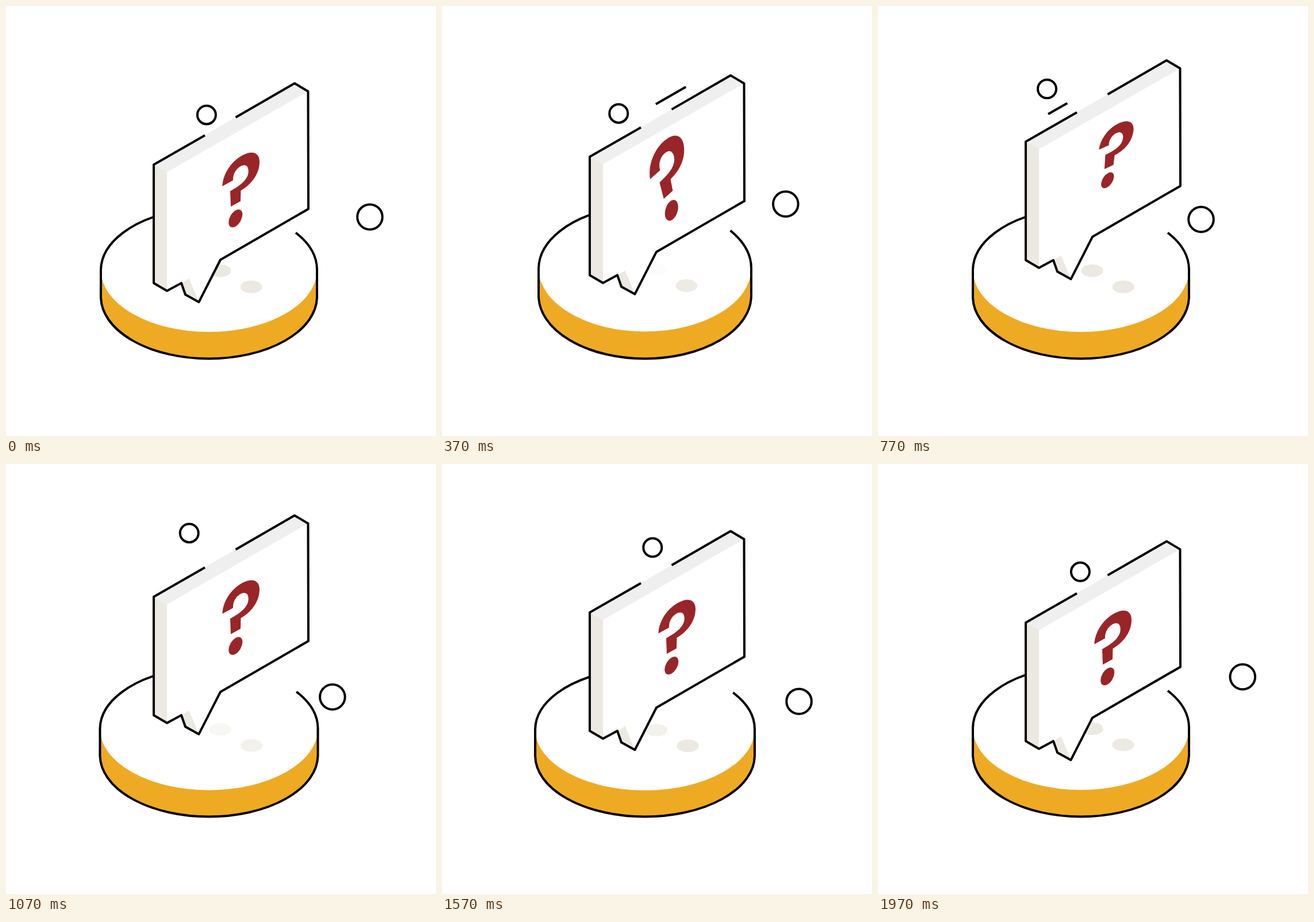
Write an HTML page that moves like this. It is 748 px wide and 748 px high and loops after 2000 ms.

```html
<!DOCTYPE html>
<html lang="en">
<head>
<meta charset="utf-8">
<title>Question bubble</title>
<style>
  html, body { margin: 0; width: 100%; height: 100%; overflow: hidden; background: #fff; }
  svg { display: block; width: 100vw; height: 100vh; }
  .ink { fill: none; stroke: #000; stroke-width: 4; stroke-linejoin: round; }
  .shade { fill: #ebe9e1; }
</style>
</head>
<body>
<svg viewBox="0 0 748 748">
  <g id="disc">
    <path fill="#efaa24" d="M165 459V505.500A188 108 0 0 0 541 505.500V459Z"/>
    <ellipse cx="353" cy="459" rx="188" ry="108" fill="#fff"/>
    <ellipse id="dotA" class="shade" cx="372.500" cy="460.500" rx="19" ry="11"/>
    <ellipse id="dotB" class="shade" cx="426.500" cy="488.500" rx="19" ry="11"/>
    <path class="ink" d="M300 356.300A188 108 0 0 0 165 459V505.500A188 108 0 0 0 541 505.500V459A188 108 0 0 0 504 394.300"/>
  </g>

  <g id="bubble">
    <path fill="#fff" d="M257 276L502 134.500L525.500 148.500L526 353L373 441.500L335.500 515L312 502L305 482L280 495.500L257 482Z"/>
    <path fill="#efefef" d="M257 276L502 134.500L525.500 148.500L280 289Z"/>
    <path class="shade" d="M257 276L280 289V495.500L257 482ZM305 482L318.500 474L335.500 515L312 502Z"/>
    <path class="ink" d="M346 225L257 276V482L280 495.500L305 482L312 502L335.500 515L373 441.500L526 353L525.500 148.500L502 134.500L399.500 193.700"/>
    <line id="dash" class="ink"/>
  </g>

  <!-- drawn around the centre of its dot -->
  <g id="mark" fill="#992528">
    <path transform="translate(-399.300 -369.500)" d="M376.300 313.500C377.500 288 397 264 419 256.500C433 252 441 258.500 441 271C441 292 427 310.500 408.500 321L408 339.500L391 349L390 322C408 312 422 301.500 421.700 287C421.500 276.500 414.500 275 407 279.500C399 284.500 394.500 293.500 395 303.300Z"/>
    <circle r="13.900" transform="matrix(.866 -.5 0 1 0 0)"/>
  </g>

  <circle id="orbA" class="ink" r="16"/>
  <circle id="orbB" class="ink" r="21.800"/>
</svg>
<script>
const LOOP = 2;
const $ = id => document.getElementById(id);
const [disc, dotA, dotB, bubble, dash, mark, orbA, orbB] =
  ['disc', 'dotA', 'dotB', 'bubble', 'dash', 'mark', 'orbA', 'orbB'].map($);

const smooth = u => { u = Math.min(1, Math.max(0, u)); return u * u * (3 - 2 * u); };
const ease = (t, from, to) => smooth((t - from) / (to - from));

// rows are [time, ...values]; eased between rows, held at the ends
function track(rows, t) {
  let i = 0;
  while (i < rows.length - 2 && t > rows[i + 1][0]) i++;
  const a = rows[i], b = rows[i + 1], u = ease(t, a[0], b[0]);
  return a.slice(1).map((v, k) => v + (b[k + 1] - v) * u);
}

const SQUASH = [[0, 0], [.15, .0175], [.35, -.0175], [.535, .0175], [.7, 0]];
// a, b, c, d of the transform, then the lift
const SWING = [
  [0, 1, 0, 0, 1, 0],
  [1 / 3, 1.058, -.262, .247, 1.077, -12],
  [2 / 3, .832, .104, -.117, .89, -70.2],
  [1, 1, 0, 0, 1, -53.8],
  [1.95, 1, 0, 0, 1, 0]
];

function blink(dot, t, start) {
  const p = t % (LOOP / 3), step = LOOP / 12;
  const dim = p < start + step ? ease(p, start, start + step) : 1 - ease(p, start + step, start + 2 * step);
  dot.setAttribute('opacity', 1 - dim);
}

function orbit(orb, x, y, degrees) {
  const a = degrees * Math.PI / 180;
  orb.setAttribute('cx', x + 38 * Math.cos(a));
  orb.setAttribute('cy', y + 38 * Math.sin(a));
}

function drawDash(t) {
  const at = u => 440 - 144 * u;
  const head = at(ease(t, 0, .77)), tail = at(ease(t, .2, 1.03));
  const height = x => 184.5 - (x - 372) * .572;
  dash.setAttribute('x1', head);
  dash.setAttribute('y1', height(head));
  dash.setAttribute('x2', tail);
  dash.setAttribute('y2', height(tail));
  dash.setAttribute('visibility', tail - head > .2 ? 'visible' : 'hidden');
}

function draw(t) {
  const [s] = track(SQUASH, t % 1);
  disc.setAttribute('transform', `translate(353 614) scale(${1 + s} ${1 - s}) translate(-353 -614)`);
  blink(dotA, t, 1 / 6);
  blink(dotB, t, 1 / 3);

  bubble.setAttribute('transform', `translate(0 ${-22.8 * (1 - Math.cos(Math.PI * t))})`);
  drawDash(t);

  const [a, b, c, d, lift] = track(SWING, t);
  mark.setAttribute('transform', `matrix(${a} ${b} ${c} ${d} 399.3 ${369.5 + lift})`);

  orbit(orbA, 330, 156.5, 60 + 180 * t);
  orbit(orbB, 598.3, 382.5, -24 - 180 * t);
}

const start = performance.now();
function tick() {
  draw((performance.now() - start) / 1000 % LOOP);
  requestAnimationFrame(tick);
}
tick();
</script>
</body>
</html>
```
